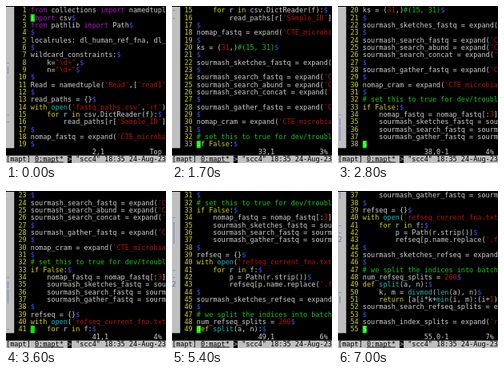
These frames come from a looping animation (200 px wide and 197 px high, 7100 ms). An HTML page with a canvas:

```html
<!DOCTYPE html>
<html lang="en">
<head>
<meta charset="utf-8">
<title>Editor scrolling</title>
<style>
html, body { margin: 0; width: 100%; height: 100%; overflow: hidden; background: #000; }
canvas { display: block; width: 200px; height: 197px; }
</style>
</head>
<body>
<canvas id="screen"></canvas>
<script>
const W = 200, H = 197, TOP = 1, COLS = 39, ROWS = 21, VIEW = 19;
const FOLD = 2, GUTTER = 6;
const CW = W / COLS, RH = (H - TOP) / ROWS;
const LOOP = 7100, STEP = 100, SCROLL_RANGE = 460;

const color = {
  text: '#cfcfcf', number: '#d0d010', eol: '#3c50f0', include: '#b414c8',
  keyword: '#d0d010', builtin: '#10bebe', constant: '#b81212', comment: '#10c810',
  bar: '#bfbfbf', fold: '#5a70c0', cursor: '#00f000', underCursor: '#a8f0a8'
};

const source = String.raw`from collections import namedtuple
import csv
from pathlib import Path

localrules: dl_human_ref_fna, dl_refseq

wildcard_constraints:
    k="\d+",
    n="\d+"

Read = namedtuple('Read',['read1','read2'])

read_paths = {}
with open('fastq_paths.csv','rt') as f:
    for r in csv.DictReader(f):
        read_paths[r['Sample_ID']] = r

nomap_fastq = expand('CTE_microbial/{s}.fastq')

ks = (31,)#(15, 31)

sourmash_sketches_fastq = expand('CTE/{s}.sig')

sourmash_search_fastq = expand('CTE/{s}.csv')
sourmash_search_abund = expand('CTE/{s}.csv')
sourmash_search_concat = expand('CTE/{s}.csv')

sourmash_gather_fastq = expand('CTE/{s}.csv')

nomap_cram = expand('CTE_microbial/{s}.cram')

# set this to true for dev/troubleshooting
if False:
    nomap_fastq = nomap_fastq[:3]
    sourmash_sketches_fastq = sourmash_sketches_fastq[:3]
    sourmash_search_fastq = sourmash_search_fastq[:3]
    sourmash_gather_fastq = sourmash_gather_fastq[:3]

refseq = {}
with open('refseq_current_fna.txt') as f:
    for r in f:
        p = Path(r.strip())
        refseq[p.name.replace('.fna.gz','')] = p

sourmash_sketches_refseq = expand('refseq/{r}.sig')

# we split the indices into batches
num_refseq_splits = 200
def split(a, n):
    k, m = divmod(len(a), n)
    return [a[i*k+min(i, m):(i+1)*k+min(i+1, m)] for i in range(n)]
sourmash_search_refseq_splits = expand('refseq/{r}.csv')

sourmash_index_splits = expand('refseq/{r}.sbt')
`.split('\n');

const rules = [
  ['comment', '#.*'],
  ['constant', `'[^']*'?|"[^"]*"?|\\b\\d+\\b`],
  ['include', '\\b(?:from|import)\\b'],
  ['keyword', '\\b(?:with|for|in|if|as|def|return|False)\\b'],
  ['builtin', '\\b(?:open|len|divmod|min|range)\\b|(?<=def )\\w+']
];
const lexer = new RegExp(rules.map(([kind, re]) => `(?<${kind}>${re})`).join('|'), 'g');

function tokenize(line) {
  const out = [];
  for (const m of line.matchAll(lexer)) {
    const kind = Object.keys(m.groups).find(k => m.groups[k] !== undefined);
    out.push([m.index, m[0], color[kind]]);
  }
  out.push([line.length, '$', color.eol]);
  return out;
}

const indent = line => Math.floor(line.search(/\S|$/) / 4);
const lines = source.map((text, i) => {
  const level = indent(text);
  const before = i ? indent(source[i - 1]) : 0;
  const fold = !level ? '' : level > before ? '-' : level === 1 ? '|' : String(level);
  return { text, fold, tokens: tokenize(text) };
});

// Time in ms, cursor line
const keys = [
  [0, 2], [800, 19], [1700, 33], [2800, 38], [3600, 41],
  [4700, 46], [6100, 52], [7000, 55]
];

function cursorLine(t) {
  const i = Math.max(1, keys.findIndex(k => k[0] >= t));
  const [t0, a] = keys[i - 1], [t1, b] = keys[i];
  return Math.floor(a + (b - a) * (t - t0) / (t1 - t0) + 1e-6);
}

const canvas = document.getElementById('screen');
const ctx = canvas.getContext('2d');
const dpr = window.devicePixelRatio || 1;
canvas.width = W * dpr;
canvas.height = H * dpr;

function fill(col, row, w, h, c) {
  ctx.fillStyle = c;
  ctx.fillRect(col * CW, TOP + row * RH, w * CW, h * RH);
}

function put(text, col, row, c) {
  ctx.fillStyle = c;
  for (let i = 0; i < text.length && col + i < COLS; i++) {
    if (text[i] !== ' ') ctx.fillText(text[i], (col + i) * CW, TOP + row * RH + 7.2);
  }
}

function drawLine(n, row) {
  const { text, fold, tokens } = lines[n - 1];
  put(fold, 0, row, color.fold);
  put(String(n).padStart(3), FOLD, row, color.number);
  let at = 0;
  for (const [start, word, c] of tokens) {
    put(text.slice(at, start), GUTTER + at, row, color.text);
    put(word, GUTTER + start, row, c);
    at = start + word.length;
  }
}

function drawStatus() {
  const row = ROWS - 1;
  fill(0, row, COLS, 1, color.bar);
  put('[mapt] 0:mapt*', 0, row, '#000');
  ctx.fillRect(7 * CW, H - 1.4, 7 * CW, 0.8);
  fill(15, row, 1, 1, '#000');
  put('>', 15, row, color.bar);
  put('"scc4" 18:35 24-Aug-23', 17, row, '#000');
}

function draw(t) {
  const line = cursorLine(t);
  const top = Math.max(1, line - VIEW + 1);
  ctx.setTransform(dpr, 0, 0, dpr, 0, 0);
  ctx.font = '8.52px "DejaVu Sans Mono", monospace';
  ctx.fillStyle = '#000';
  ctx.fillRect(0, 0, W, H);
  fill(0, 0, FOLD, VIEW, color.bar);
  for (let i = 0; i < VIEW; i++) drawLine(top + i, i);

  const text = lines[line - 1].text;
  fill(GUTTER, line - top, 1, 1, color.cursor);
  put(text[0] || '$', GUTTER, line - top, color.underCursor);

  const above = top - 1;
  const share = above ? Math.floor(above * 100 / SCROLL_RANGE) + '%' : 'Top';
  put(`${line},${text ? '1' : '0-1'}`, 21, VIEW, color.text);
  put(share.padStart(3), 35, VIEW, color.text);
  drawStatus();
}

const begin = performance.now();
function tick() {
  const t = (performance.now() - begin) % LOOP;
  draw(Math.floor(t / STEP) * STEP);
  requestAnimationFrame(tick);
}
tick();
</script>
</body>
</html>
```
